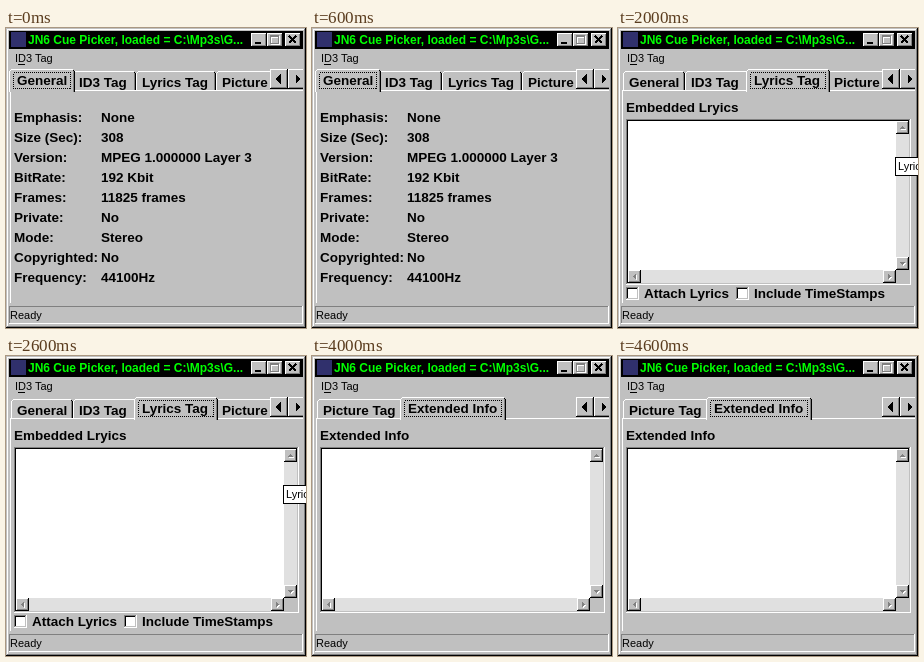
An HTML page for the animation above (5000 ms loop, 300 px wide and 300 px high).

```html
<!DOCTYPE html>
<html lang="en">
<head>
<meta charset="utf-8">
<title>Tag window</title>
<style>
  html, body { margin: 0; width: 100%; height: 100%; overflow: hidden; background: #c0c0c0; }
  svg { display: block; width: 300px; height: 300px; shape-rendering: crispEdges; }
  text { font: bold 13.5px "Liberation Sans", Arial, sans-serif; fill: #000; white-space: pre; }
  .title { font-size: 12px; fill: #0f0; }
  .small { font-size: 11px; font-weight: normal; }
  .lime { fill: #0f0; }
  .scene { visibility: hidden; animation: show 5s step-end infinite; }
  @keyframes show {
    0% { visibility: visible; }
    20%, 100% { visibility: hidden; }
  }
</style>
</head>
<body>
<svg id="stage" viewBox="0 0 300 300"></svg>
<script>
const FACE = '#c0c0c0', DARK = '#808080', WHITE = '#fff', BLACK = '#000', TRACK = '#e0e0e0';
const BAR = 13; // scroll bar thickness

const rect = (x, y, w, h, fill) =>
  `<rect x="${x}" y="${y}" width="${w}" height="${h}" fill="${fill}"/>`;
const text = (x, y, s, cls = '', extra = '') =>
  `<text x="${x}" y="${y}" class="${cls}" ${extra}>${s}</text>`;
const path = (d, fill) => `<path d="${d}" fill="${fill}"/>`;

// One pixel frame: a = top and left, b = bottom and right
const edge = (x, y, w, h, a, b) =>
  rect(x, y, w, 1, a) + rect(x, y, 1, h, a) +
  rect(x, y + h - 1, w, 1, b) + rect(x + w - 1, y, 1, h, b);

const raised = (x, y, w, h) => rect(x, y, w, h, FACE) +
  edge(x, y, w, h, WHITE, BLACK) + edge(x + 1, y + 1, w - 2, h - 2, FACE, DARK);

const sunken = (x, y, w, h, fill = WHITE) => rect(x, y, w, h, fill) +
  edge(x, y, w, h, DARK, WHITE) + edge(x + 1, y + 1, w - 2, h - 2, BLACK, FACE);

const ARROWS = {
  up: s => `m${-s} ${s / 2}h${2 * s}l${-s} ${-s}z`,
  down: s => `m${-s} ${-s / 2}h${2 * s}l${-s} ${s}z`,
  left: s => `m${s / 2} ${-s}v${2 * s}l${-s} ${-s}z`,
  right: s => `m${-s / 2} ${-s}v${2 * s}l${s} ${-s}z`
};
const arrow = (x, y, dir, size, fill = BLACK) => path(`M${x} ${y}` + ARROWS[dir](size), fill);

function arrowButton(x, y, dir, off) {
  const cx = x + 6.5, cy = y + 6.5;
  return raised(x, y, BAR, BAR) +
    (off ? arrow(cx + 1, cy + 1, dir, 3.5, WHITE) : '') +
    arrow(cx, cy, dir, 3.5, off ? DARK : BLACK);
}

function tab(x, w, label, on, focus) {
  const y = on ? 41 : 43, h = on ? 23 : 19;
  const left = on ? x - 2 : x, width = on ? w + 4 : w;
  return rect(left, y + 2, width, h - 2, FACE) +
    rect(left, y + 2, 1, h - 2, WHITE) + rect(left + 1, y + 1, 1, 1, WHITE) +
    rect(left + 2, y, width - 4, 1, WHITE) +
    rect(left + width - 2, y + 2, 1, h - 2, DARK) +
    rect(left + width - 1, y + 2, 1, h - 2, BLACK) +
    rect(left + width - 2, y + 1, 1, 1, BLACK) +
    text(x + 6, on ? 57 : 59, label) +
    (focus ? `<rect x="${left + 4.5}" y="44.5" width="${width - 9}" height="16" fill="none" stroke="#000" stroke-dasharray="1 1"/>` : '');
}

const TABS = [['General', 62], ['ID3 Tag', 63], ['Lyrics Tag', 80], ['Picture Tag', 85], ['Extended Info', 102]];

function tabs(first, current, focus) {
  let x = 5, out = '', front = '';
  TABS.slice(first).forEach(([label, w], i) => {
    if (first + i === current) front = tab(x, w, label, true, focus);
    else out += tab(x, w, label);
    x += w;
  });
  return rect(4, 62, 293, 1, WHITE) + `<g clip-path="url(#strip)">${out}${front}</g>` +
    `<g clip-path="url(#inside)">${raised(264, 41, 18, 20)}${raised(282, 41, 18, 20)}</g>` +
    arrow(272, 51, 'left', 5) + arrow(292, 51, 'right', 5);
}

function titleBar(fill) {
  return rect(3, 3, 294, 18, fill) + rect(5, 4, 15, 15, '#30306c') +
    text(22, 16, 'JN6 Cue Picker, loaded = C:\\Mp3s\\G...', 'title') +
    raised(245, 5, 16, 14) + raised(261, 5, 16, 14) + raised(279, 5, 16, 14) +
    rect(249, 14, 6, 2, BLACK) +
    [[1, WHITE], [0, DARK]].map(([d, c]) =>
      edge(264 + d, 7 + d, 9, 9, c, c) + rect(264 + d, 8 + d, 9, 1, c)).join('') +
    '<path d="M283 8l7 7M290 8l-7 7" stroke="#000" stroke-width="1.6"/>';
}

const rows = (x, y, step, items) => items.map((s, i) => text(x, y + i * step, s)).join('');

const memo = () => sunken(8, 91, 285, 166) +
  rect(278, 93, BAR, 149, TRACK) + rect(10, 242, 268, BAR, TRACK) + rect(278, 242, BAR, BAR, FACE) +
  arrowButton(278, 93, 'up', true) + arrowButton(278, 229, 'down', true) +
  arrowButton(10, 242, 'left', true) + arrowButton(265, 242, 'right', true);

const check = (x, label) => sunken(x, 259, 13, 13) + text(x + 18, 270, label);

const button = (y, label) => raised(222, y, 71, 20) +
  text(258, y + 14, label, '', 'text-anchor="middle"');

function general() {
  return rows(8, 94, 20, ['Emphasis:', 'Size (Sec):', 'Version:', 'BitRate:', 'Frames:',
      'Private:', 'Mode:', 'Copyrighted:', 'Frequency:']) +
    rows(95, 94, 20, ['None', '308', 'MPEG 1.000000 Layer 3', '192 Kbit', '11825 frames',
      'No', 'Stereo', 'No', '44100Hz']);
}

function tagForm() {
  const fields = ['Departing (techno/goth)', 'Corvelathia', 'Lanterns In The Marsh', '1998', ''];
  return rows(8, 93, 20, ['Title:', 'Artist:', 'Album:', 'Year:', 'Comment:', 'Genre:']) +
    fields.map((s, i) => sunken(76, 82 + 20 * i, 198, 20) + text(78, 96 + 20 * i, s)).join('') +
    sunken(76, 182, 198, 84) + rect(78, 248, 181, 16, BLACK) +
    rows(80, 197, 16, ['Classical', 'Instrumental', 'Acid', 'House']) +
    text(80, 261, 'Game', 'lime') +
    rect(259, 184, BAR, 80, TRACK) + arrowButton(259, 184, 'up') +
    raised(259, 207, BAR, 7) + arrowButton(259, 251, 'down');
}

function lyrics() {
  return text(8, 84, 'Embedded Lryics') + memo() +
    check(8, 'Attach Lyrics') + check(118, 'Include TimeStamps') +
    rect(277, 129, 25, 19, WHITE) + edge(277, 129, 25, 19, BLACK, BLACK) +
    text(280, 142, 'Lyrics', 'small');
}

function pictures() {
  return text(8, 84, 'Picture Links') + sunken(8, 91, 209, 133) +
    button(91, 'Remove') + button(111, 'Add') +
    rows(8, 244, 20, ['Path:', 'Comment:']) +
    sunken(78, 231, 211, 20) + sunken(78, 251, 211, 20);
}

const extended = () => text(8, 84, 'Extended Info') + memo();

function frame() {
  return rect(0, 0, 300, 300, FACE) + edge(0, 0, 300, 300, FACE, BLACK) +
    edge(1, 1, 298, 298, WHITE, DARK) +
    text(9, 34, 'ID3 Tag', 'small') + rect(12, 36, 7, 1, BLACK) +
    rect(4, 63, 1, 212, WHITE) +
    edge(3, 278, 294, 18, DARK, WHITE) + text(4, 291, 'Ready', 'small');
}

const scenes = [
  { first: 0, draw: general },
  { first: 0, draw: tagForm, inactive: true },
  { first: 0, draw: lyrics },
  { first: 1, draw: pictures },
  { first: 3, draw: extended }
];

document.getElementById('stage').innerHTML =
  '<defs><clipPath id="strip"><rect x="3" y="40" width="261" height="25"/></clipPath>' +
  '<clipPath id="inside"><rect x="3" y="40" width="294" height="25"/></clipPath>' +
  `<linearGradient id="fade"><stop stop-color="${BLACK}"/><stop offset="1" stop-color="${FACE}"/></linearGradient></defs>` +
  frame() +
  scenes.map(({ first, draw, inactive }, i) =>
    `<g class="scene" style="animation-delay:${i ? i - 5 : 0}s">` +
    titleBar(inactive ? 'url(#fade)' : BLACK) + tabs(first, i, !inactive) + draw() + '</g>').join('');
</script>
</body>
</html>
```
